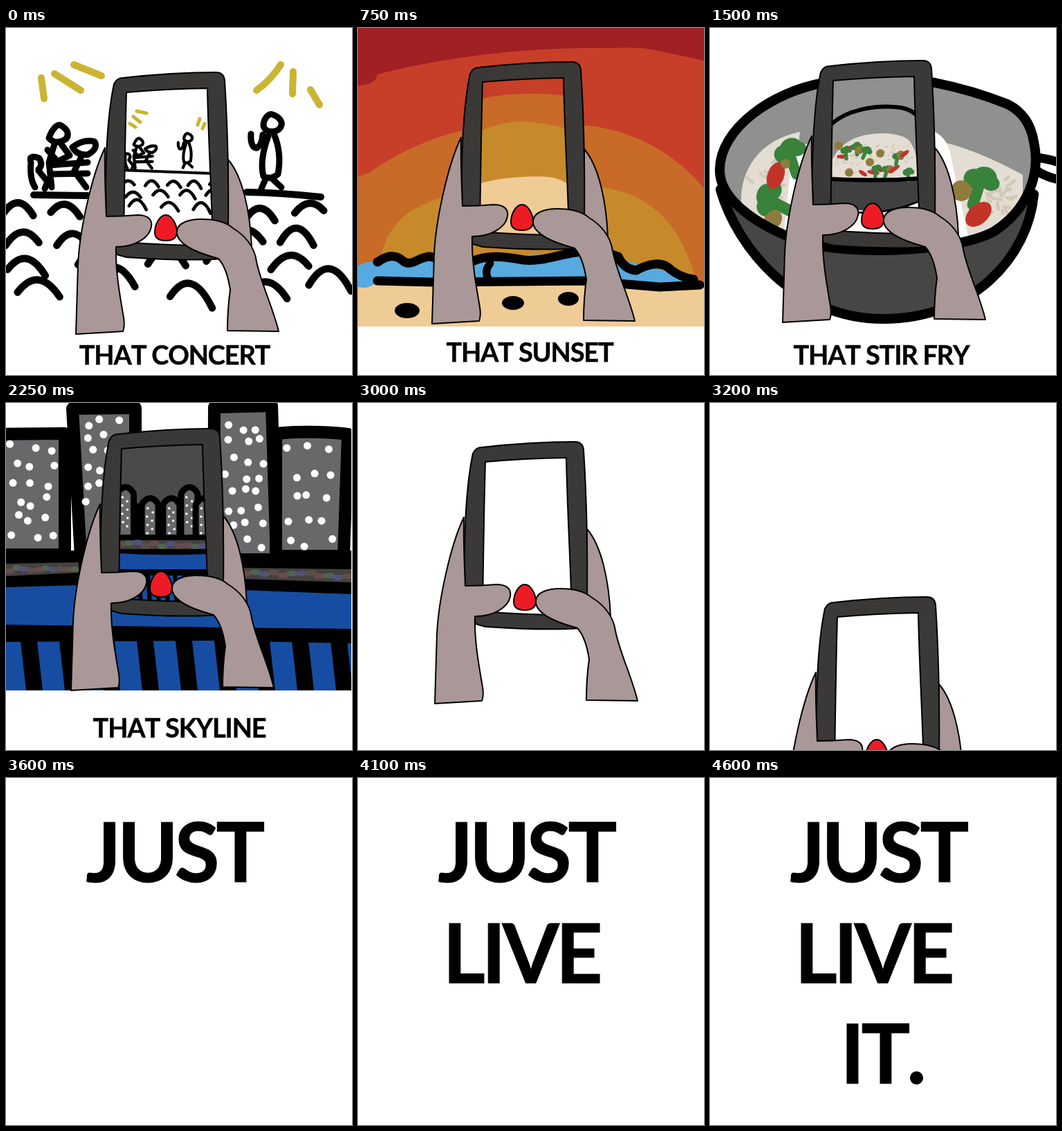
An HTML page that plays this animation: 500x501 px, repeating every 5600 ms.

```html
<!DOCTYPE html>
<html lang="en">
<head>
<meta charset="utf-8">
<title>Just live it</title>
<style>
  html, body { margin: 0; width: 100%; height: 100%; overflow: hidden; background: #fff; }
  svg { display: block; width: 100%; height: 100%; }
  text { font-family: Lato, "Open Sans", sans-serif; font-weight: 700; text-anchor: middle;
         stroke: #000; font-kerning: none; }
  .cap { font-size: 38px; stroke-width: .4px; letter-spacing: -1.2px; }
  .big { font-size: 118px; stroke-width: 1px; letter-spacing: -5px; }
  .ln { fill: none; stroke-linecap: round; stroke-linejoin: round; }
</style>
</head>
<body>
<svg id="stage" viewBox="0 0 500 501"></svg>
<script>
const SKIN = '#a99897', GREEN = '#38823a', RED = '#c23327', OLIVE = '#8f7b3d', GREY = '#90908e',
      RICE = '#e3ddd4', GOLD = '#cab432', BLUE = '#164da2', WALL = '#68686a', ROAD = '#454140';

const line = (w, d, c = '#000') => `<path class="ln" d="${d}" stroke="${c}" stroke-width="${w}"/>`;
const fill = (c, d) => `<path d="${d}" fill="${c}"/>`;
const shape = (c, w, d) => `<path d="${d}" fill="${c}" stroke="#000" stroke-width="${w}" stroke-linejoin="round"/>`;
const oval = (c, x, y, rx, ry = rx, a = 0) =>
  `<ellipse cx="${x}" cy="${y}" rx="${rx}" ry="${ry}" fill="${c}" transform="rotate(${a} ${x} ${y})"/>`;
const rect = (c, x, y, w, h) => `<rect x="${x}" y="${y}" width="${w}" height="${h}" fill="${c}"/>`;
const place = (x, y, k, body, a = 0) => `<g transform="translate(${x} ${y}) rotate(${a}) scale(${k})">${body}</g>`;
const clip = (id, body) => `<g clip-path="url(#${id})">${body}</g>`;
const text = (kind, s, x, y) => `<text class="${kind}" x="${x}" y="${y}">${s}</text>`;
const repeat = (n, f) => Array.from({ length: n }, (_, i) => f(i)).join('');

// Seeded random numbers between a and b
function random(seed) {
  return (a, b) => a + (b - a) * (seed = (seed * 16807) % 2147483647) / 2147483647;
}

const SCREEN = 'M184 85Q240 80 301 79C302 140 306 210 308 274L308 306Q240 306 180 301C181 230 182 150 184 85Z';

// Phone with both hands; the screen body is given in stage coordinates.
function phone(dx, dy, body = '') {
  return place(dx, dy, 1,
    shape(SKIN, 2, 'M331 182C352 206 363 258 365 309L331 290Z') +
    shape('#3a3937', 2, 'M166 73Q170 64 179 64Q250 56 313 56Q325 56 326 68C330 130 332 210 331 290L324 325Q270 329 184 323L170 319L155 265C152 200 156 120 166 73Z') +
    fill('#fff', SCREEN) +
    clip('screen', place(-dx, -dy, 1, body)) +
    line(2, SCREEN) +
    shape(SKIN, 2, 'M153 165C134 204 116 285 114 335L111 434L179 430Q182 422 180 410C174 375 168 342 169 308C195 308 217 296 220 279C222 268 214 262 200 262Q178 264 155 264C154 235 152 200 153 165Z') +
    shape(SKIN, 2, 'M257 285C258 273 275 268 292 268C313 268 329 273 338 281C353 290 369 306 372 329C378 360 396 396 404 430L330 429Q330 399 334 370C331 350 326 335 317 325C296 319 274 312 263 300Q256 293 257 285Z') +
    shape('#ed1c24', 2, 'M241 262C250 262 257 277 257 286C257 296 250 299 241 299C231 299 225 296 225 287C225 276 232 262 241 262Z'));
}

// Rows of bent heads that grow towards the viewer
function crowd(seed, x, y, w, rows, size) {
  const r = random(seed);
  let d = '';
  for (let i = 0; i < rows; i++) {
    const s = size * (1 + i * .15);
    for (let px = x + r(-.3, .3) * s; px < x + w; px += s * r(1.5, 1.9))
      d += `M${px} ${y + i * size * .85 + r(-.15, .15) * s}q${s * .5} ${-s * r(.6, .9)} ${s} ${s * r(-.1, .3)}`;
  }
  return line(size / 4, d);
}

function concert() {
  const drummer = line(9,
    'M62 159C66 147 74 137 80 141Q94 150 87 160Q72 170 62 159ZM96 172Q112 160 128 164Q134 174 118 183Q102 184 96 172Z' +
    'M70 168L62 194L66 230M80 168L92 184L64 198L118 194M64 211L118 210M60 176L72 190M108 188L98 208' +
    'M36 194Q32 182 48 188Q54 198 47 204M36 194Q34 218 42 230M47 206L60 222L56 232M104 214L116 230');
  const singer = line(9,
    'M372 141C372 131 380 122 385 125C395 128 401 136 397 143C392 152 374 152 372 141Z' +
    'M379 156C372 175 367 195 372 214Q382 220 393 211C397 190 394 170 388 155' +
    'M375 218L369 232M384 217L398 230M354 153C353 166 357 175 363 173Q370 168 371 154');
  const small =
    line(5, 'M189 120L203 123M184 128L194 136M179 138L187 143M280 131L277 140M287 138L284 145', GOLD) +
    line(4, 'M165 205L300 210') + place(155, 92, .48, drummer) + place(86, 95, .46, singer) +
    crowd(11, 172, 228, 125, 3, 19);
  return line(10, 'M51 72L55 102M70 66L108 90M98 53L138 69M362 90Q382 76 397 53M415 63L414 95M440 89L453 111', GOLD) +
    line(10, 'M40 241L118 242M348 237Q400 238 455 244') + drummer + singer +
    crowd(23, 10, 272, 440, 4, 42) + phone(-10, 8, small) + text('cap', 'THAT CONCERT', 243.5, 486);
}

function sunset() {
  const sky =
    rect('#c73f29', 0, 0, 500, 431) +
    fill('#a02023', 'M0 0H500V47L424 31Q400 27 370 29C240 27 120 43 28 67Q26 82 0 83Z') +
    fill('#c96b28', 'M0 215L16 209C70 172 120 152 190 140H310C380 140 450 172 500 231V431H0Z') +
    fill('#c78a2b', 'M32 340C36 300 60 270 90 257Q130 238 180 228H320C400 228 458 262 486 355V375H32Z') +
    rect('#efcb96', 0, 369, 500, 62) +
    fill('#56aadf', 'M0 343Q12 336 28 337L65 334L160 332L325 324L378 334L420 344L486 364L440 373L28 366Q16 378 0 374Z');
  const sea =
    line(13, 'M28 338C46 326 56 328 66 337C78 345 88 330 104 330Q135 338 165 337C190 326 215 331 240 335C270 338 295 324 326 323Q350 320 376 330Q384 348 402 350C420 340 440 336 452 349Q466 360 485 363') +
    line(13, 'M28 365L110 367L330 365L436 374L494 371') + line(11, 'M191 340Q182 350 188 362') +
    oval('#000', 71, 408, 18, 11) + oval('#000', 224, 397, 16, 10) + oval('#000', 304, 391, 15, 10);
  const view =
    rect('#c73f29', 160, 60, 160, 250) +
    fill('#c96b28', 'M165 105Q230 88 310 99V320H165Z') +
    fill('#c78a2b', 'M165 154Q205 135 237 135Q275 136 315 150V320H165Z') +
    fill('#efcb96', 'M165 228C190 217 250 212 275 215Q295 217 310 230V320H165Z');
  return sky + sea + phone(-4, -7, view) + text('cap', 'THAT SUNSET', 248, 482);
}

function grains(seed, n, x, y, w, h, len) {
  const r = random(seed);
  return line(len / 3, repeat(n, () =>
    `M${r(x, x + w)} ${r(y, y + h)}l${r(-len, len)} ${r(-.7, .3) * len}`), '#d3c8b6');
}

function stirFry() {
  const broccoli = (x, y, k, a) => place(x, y, k,
    line(15, 'M0 6L-4 36', GREEN) + oval(GREEN, -9, 2, 13) + oval(GREEN, 5, -3, 16, 13) + oval(GREEN, 14, 4, 12, 10), a);
  const rim = 'M14 205C14 145 90 92 165 79Q245 66 325 79Q380 90 430 110Q462 126 468 165C478 210 460 262 410 294C350 326 180 330 120 304C60 280 14 245 14 205Z';
  const pan =
    line(13, 'M470 187Q486 188 500 193M472 206Q484 214 500 218') +
    shape('#464646', 14, 'M15 233C40 320 125 420 250 420C380 420 460 330 468 240Z') +
    fill(GREY, rim) +
    fill(RICE, 'M45 250C44 206 70 162 130 150L112 305Q60 290 45 250Z') +
    fill('#fff', 'M128 170L116 205L106 303H150V165Z') +
    fill(RICE, 'M338 165Q390 178 452 212V252Q425 288 372 308Z') +
    fill('#fff', 'M325 150Q344 160 348 185L374 306L325 315Z') +
    grains(7, 26, 58, 190, 45, 82, 13) + grains(31, 24, 395, 215, 42, 60, 14) +
    broccoli(113, 177, 1, -25) + broccoli(83, 248, 1.1, -70) + broccoli(391, 217, 1.1, 10) +
    oval(RED, 95, 213, 12, 20, 20) + oval(RED, 388, 269, 22, 14, -42) +
    oval(OLIVE, 109, 196, 7) + oval(OLIVE, 91, 277, 12, 15, 35) + oval(OLIVE, 363, 235, 15) +
    line(14, rim);
  const r = random(12);
  const bits = repeat(21, i => {
    const x = 186 + i * 5, y = r(170, 210);
    return [oval(OLIVE, x, y, 6), oval(RED, x, y, r(5, 10), 3, r(-50, 40)), broccoli(x, y, .35, r(-20, 20))][i % 3];
  });
  const view =
    rect('#fff', 160, 60, 160, 250) + rect(GREY, 160, 60, 160, 158) +
    fill('#404040', 'M165 218H310V248Q265 270 205 262L165 254Z') +
    fill(RICE, 'M177 216V190Q188 164 222 155Q262 147 285 160Q300 172 301 216Z') +
    grains(5, 55, 182, 168, 112, 44, 6) + bits +
    line(6, 'M172 142C195 118 240 110 276 115Q294 118 304 132') +
    line(6, 'M172 218Q240 222 304 217') + line(3, 'M200 266Q262 270 306 248');
  return pan + phone(-6, -9, view) + text('cap', 'THAT STIR FRY', 247.5, 486);
}

function skyline() {
  const r = random(99), tints = ['#6b4a4c', '#4f6550', '#50527c', '#5d4f49'];
  const road = (x, y, w, n, slope) => repeat(n, i => {
    const dx = (i + .5) * w / n;
    return oval(tints[i % 4], x + dx, y + slope * dx + r(-3, 3), w / n * .65, 4);
  });
  // One lit window per cell, off centre
  const lights = (x, y, w, h, rows) => repeat(rows * 3, i =>
    oval('#fff', x + (i % 3 + r(.15, .85)) * w / 3, y + (Math.floor(i / 3) + r(.2, .8)) * h / rows, 5.5));
  const tower = d => shape(WALL, 18, d);
  const city =
    rect('#000', 0, 213, 500, 202) +
    tower('M-14 45L85 44V219H-14Z') + lights(2, 54, 72, 150, 6) +
    tower('M96 8L187 7V222H108Z') + lights(106, 17, 70, 130, 6) +
    tower('M301 6L384 4L391 226H300Z') + lights(312, 20, 64, 195, 8) +
    tower('M390 44Q440 39 494 45L488 221H390Z') + lights(402, 55, 74, 160, 5) +
    fill(ROAD, 'M0 232L105 230V245L0 250Z') + road(0, 240, 104, 10, 0) +
    fill(ROAD, 'M340 238L500 240V259L340 254Z') + road(340, 246, 160, 12, .02) +
    fill(BLUE, 'M0 266L140 262L340 270L500 276V326L300 324L0 320Z') +
    fill(BLUE, 'M0 345L300 343L500 347V415H0Z') +
    line(18, 'M6 331Q250 330 490 337') +
    repeat(9, i => fill('#000', `M${20 + i * 56} 335h24l9 80h-24Z`));
  const block = i => {
    const x = 165 + 38 * i - 2.4 * i * i, y = i % 3 ? 142 : 126, d = `M${x} ${y + 6}q8 -12 15 0V190h-15Z`;
    return shape('#000', 18, d) + fill(WALL, d) +
      repeat(8, k => oval('#fff', x + 4 + k % 2 * 7 + r(-1, 1), y + 10 + k * 6, 1.8));
  };
  const view =
    rect('#4a4a4b', 150, 50, 160, 130) + rect('#000', 150, 145, 160, 150) + repeat(5, block) +
    rect('#000', 150, 190, 160, 10) + rect(ROAD, 150, 198, 160, 13) + road(160, 204, 132, 11, 0) +
    fill(BLUE, 'M150 216Q230 222 310 217V240H150Z') + rect(BLUE, 150, 249, 160, 38) +
    line(8, 'M150 245H310') + repeat(11, i => line(6, `M${166 + i * 13} 246l3 44`));
  return clip('land', city) + phone(-17, -19, view) + text('cap', 'THAT SKYLINE', 250.5, 483);
}

// [start, end, drawing]
const cast = [
  [0, 750, concert()],
  [750, 1500, sunset()],
  [1500, 2250, stirFry()],
  [2250, 3000, skyline()],
  [3000, 3400, phone(0, 0)],
  [3600, 5600, text('big', 'JUST', 242.5, 150)],
  [4100, 5600, text('big', 'LIVE', 235.5, 296)],
  [4600, 5600, text('big', 'IT.', 248, 441)]
];

const stage = document.getElementById('stage');
stage.innerHTML =
  `<defs><clipPath id="screen"><path d="${SCREEN}"/></clipPath>` +
  '<clipPath id="land"><rect width="499" height="415"/></clipPath></defs>' +
  cast.map(c => `<g class="act">${c[2]}</g>`).join('');
const acts = [...stage.querySelectorAll('.act')];

const LOOP = 5600, t0 = performance.now();
function draw() {
  const t = (performance.now() - t0) % LOOP;
  acts.forEach((g, i) => g.style.display = t >= cast[i][0] && t < cast[i][1] ? '' : 'none');
  // The phone drops out of view in steps of 100 ms.
  const step = Math.max(0, Math.floor((t - 3000) / 100));
  acts[4].setAttribute('transform', `translate(0 ${step * 112})`);
  requestAnimationFrame(draw);
}
draw();
</script>
</body>
</html>
```
